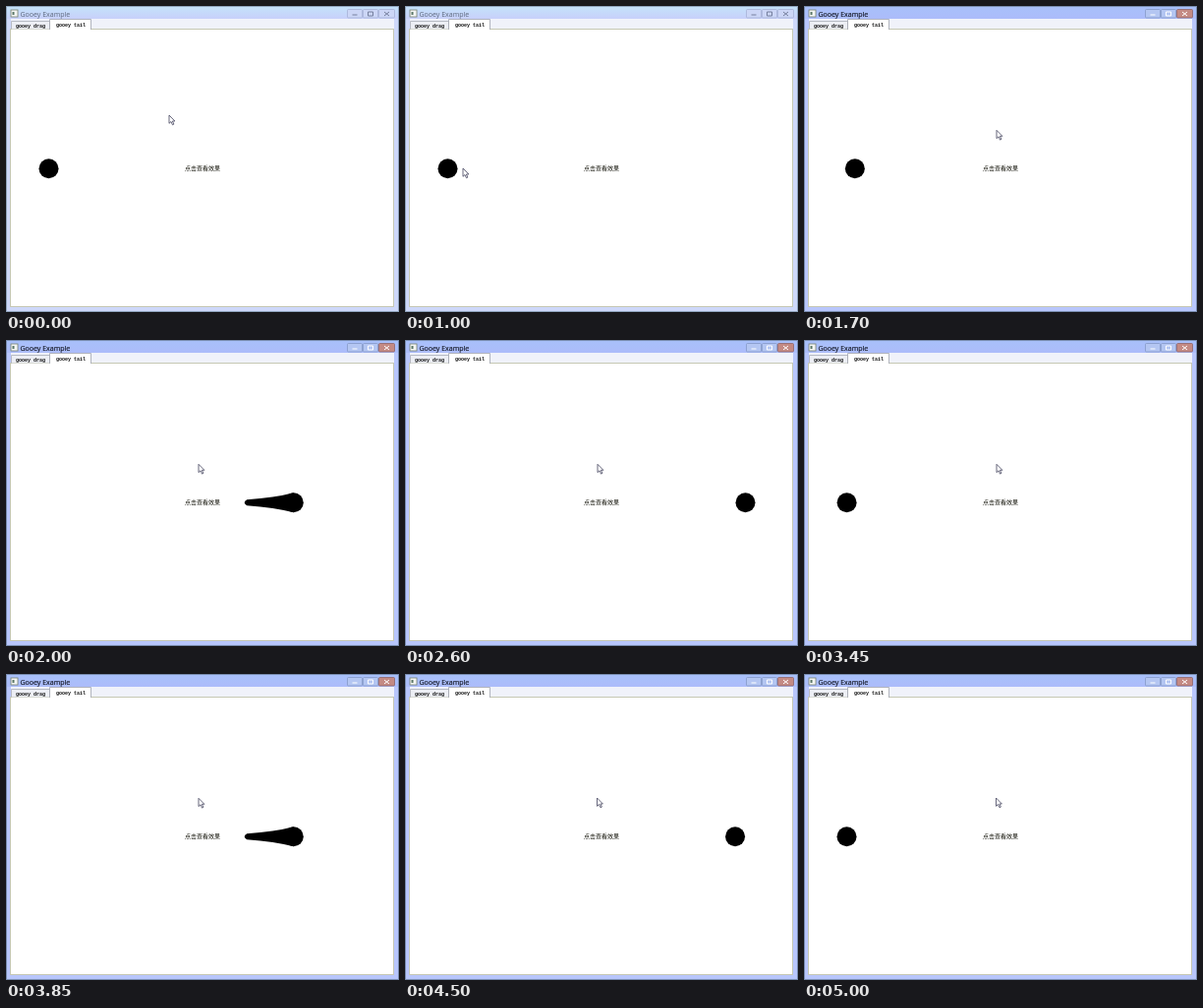
Recreate the animation shown at these times as an HTML page. Size 400 px wide and 311 px high, loop 5100 ms.

```html
<!DOCTYPE html>
<html lang="en">
<head>
<meta charset="utf-8">
<title>Gooey Example</title>
<style>
  html, body { margin: 0; width: 100%; height: 100%; overflow: hidden; background: #fff; }
  svg { display: block; width: 100vw; height: 100vh; }
  .title { font: 7px "Open Sans", sans-serif; fill: #101420; stroke: #101420; stroke-width: .15; }
  .tab { font: bold 5px "Liberation Mono", monospace; fill: #111; }
  .hint { font: 500 6px "Noto Sans CJK SC", "Noto Sans CJK", sans-serif; fill: #14140a; }
  .frame { fill: #b8c6fc; stroke: #7c90b4; }
  .bar { fill: url(#activeBar); }
  .btn { fill: #b4c6f2; stroke: #8094c2; stroke-width: .7; }
  .close { fill: #c48a84; stroke: #8c5c5c; }
  .glyph { fill: none; stroke: #fff; stroke-width: 1; }
  .inactive .title { fill: #5c687c; stroke: none; }
  .inactive .frame { fill: #ced8fa; stroke: #93a8c2; }
  .inactive .bar { fill: url(#inactiveBar); }
  .inactive .btn { fill: #ccd6f6; stroke: #a3acd2; }
  .inactive .glyph { stroke: #747e9c; }
</style>
</head>
<body>
<svg viewBox="0 0 400 311" preserveAspectRatio="none">
  <defs>
    <linearGradient id="activeBar" x2="0" y2="1">
      <stop stop-color="#a8c0fa"/><stop offset="1" stop-color="#acbcfa"/>
    </linearGradient>
    <linearGradient id="inactiveBar" x2="0" y2="1">
      <stop stop-color="#c4e2fa"/><stop offset="1" stop-color="#c8d0fa"/>
    </linearGradient>
  </defs>
  <g id="window">
    <rect class="frame" x=".5" y=".5" width="399" height="310"/>
    <rect class="bar" x="1" y="1" width="398" height="12"/>
    <rect x="5" y="4" width="7" height="7" fill="#f4f6f4" stroke="#75816f" stroke-width=".8"/>
    <rect x="6.5" y="6" width="2" height="3" fill="#5c7868"/>
    <text class="title" x="14.5" y="10.5">Gooey Example</text>
    <rect class="btn" x="347.5" y="3.5" width="15" height="8.5" rx="1"/>
    <rect class="btn" x="363.5" y="3.5" width="15" height="8.5" rx="1"/>
    <rect class="btn close" x="379.5" y="3.5" width="16" height="8.5" rx="1"/>
    <path class="glyph" d="M352.5 9h5M368.5 6h5v4h-5zM385 6l5 4M390 6l-5 4"/>
    <rect x="5" y="13" width="390" height="11" fill="#f0f2fa"/>
    <rect x="4.5" y="23.5" width="390" height="282" fill="#fff" stroke="#c6c8b4"/>
    <path d="M5.5 23.5v-8h39v8" fill="#eceef4" stroke="#aaaeb8" stroke-width=".8"/>
    <path d="M44.5 24v-10.5h42V24" fill="#fff" stroke="#a0a4ae" stroke-width=".8"/>
    <path d="M45 24h41" stroke="#fff"/>
    <text class="tab" x="10" y="21.5">gooey drag</text>
    <text class="tab" x="51" y="20.5">gooey tail</text>
  </g>
  <text class="hint" x="182" y="167.2">点击查看效果</text>
  <path id="tail"/>
  <circle id="ball" cy="165.2" r="10"/>
  <path id="cursor" d="M0 0v8.3l2-1.8 1.5 3.3 1.4-.7-1.5-3.1h2.5z"
        fill="#fff" stroke="#42425c" stroke-width=".8"/>
</svg>
<script>
const LOOP = 5100, STEP = 50;
const LEFT = 43.5, RIGHT = 356.5, MID_Y = 165.2, RADIUS = 10;
const ACTIVATE_AT = 1450;

const legs = [
  { start: 1572, shown: 1600, duration: 680, from: LEFT, to: RIGHT },
  { start: 2475, shown: 2600, duration: 625, from: RIGHT, to: LEFT },
  { start: 3422, shown: 3450, duration: 680, from: LEFT, to: RIGHT },
  { start: 4330, shown: 4500, duration: 670, from: RIGHT, to: LEFT }
];

// Cursor way points: time, x, y
const pointer = [
  [0, 166, 111], [250, 140, 49], [550, 66, 146], [700, 50, 186],
  [850, 59, 165], [1000, 59, 165], [1400, 196, 126.3],
  [4000, 196, 126.3], [4050, 195.5, 126], [LOOP, 195.5, 126]
];

const $ = id => document.getElementById(id);
const clamp = v => Math.min(1, Math.max(0, v));
const mix = (a, b, k) => a + (b - a) * k;
const smooth = k => k * k * (3 - 2 * k);
const easeInOut = k => k < .5 ? 4 * k ** 3 : 1 - 4 * (1 - k) ** 3;

function pointerAt(time) {
  const i = pointer.findIndex(p => p[0] > time);
  const [t0, x0, y0] = pointer[i - 1], [t1, x1, y1] = pointer[i];
  const k = smooth((time - t0) / (t1 - t0));
  return [mix(x0, x1, k), mix(y0, y1, k)];
}

function ballAt(time) {
  const leg = legs.filter(l => time >= l.shown).pop();
  if (!leg) return { x: LEFT, stretch: 0 };
  const k = clamp((time - leg.start) / leg.duration);
  const bell = Math.sin(Math.PI * clamp((k - .27) / .63)) ** 2;
  return {
    x: mix(leg.from, leg.to, easeInOut(k)),
    stretch: 50 * bell * Math.sign(leg.from - leg.to)
  };
}

function tailPath(x, stretch) {
  if (Math.abs(stretch) < 2) return "";
  const tip = x + stretch, bend = x + stretch * .4;
  return `M${x} ${MID_Y - RADIUS}Q${bend} ${MID_Y - 5} ${tip} ${MID_Y - 3}` +
    `Q${tip + Math.sign(stretch) * 5} ${MID_Y} ${tip} ${MID_Y + 3}` +
    `Q${bend} ${MID_Y + 5} ${x} ${MID_Y + RADIUS}Z`;
}

function draw(now) {
  const time = Math.floor(now % LOOP / STEP) * STEP;
  const { x, stretch } = ballAt(time);
  $("window").classList.toggle("inactive", time < ACTIVATE_AT);
  $("ball").setAttribute("cx", x);
  $("tail").setAttribute("d", tailPath(x, stretch));
  $("cursor").setAttribute("transform", `translate(${pointerAt(time)})`);
}

const origin = performance.now();
function tick() {
  draw(performance.now() - origin);
  requestAnimationFrame(tick);
}
tick();
</script>
</body>
</html>
```
